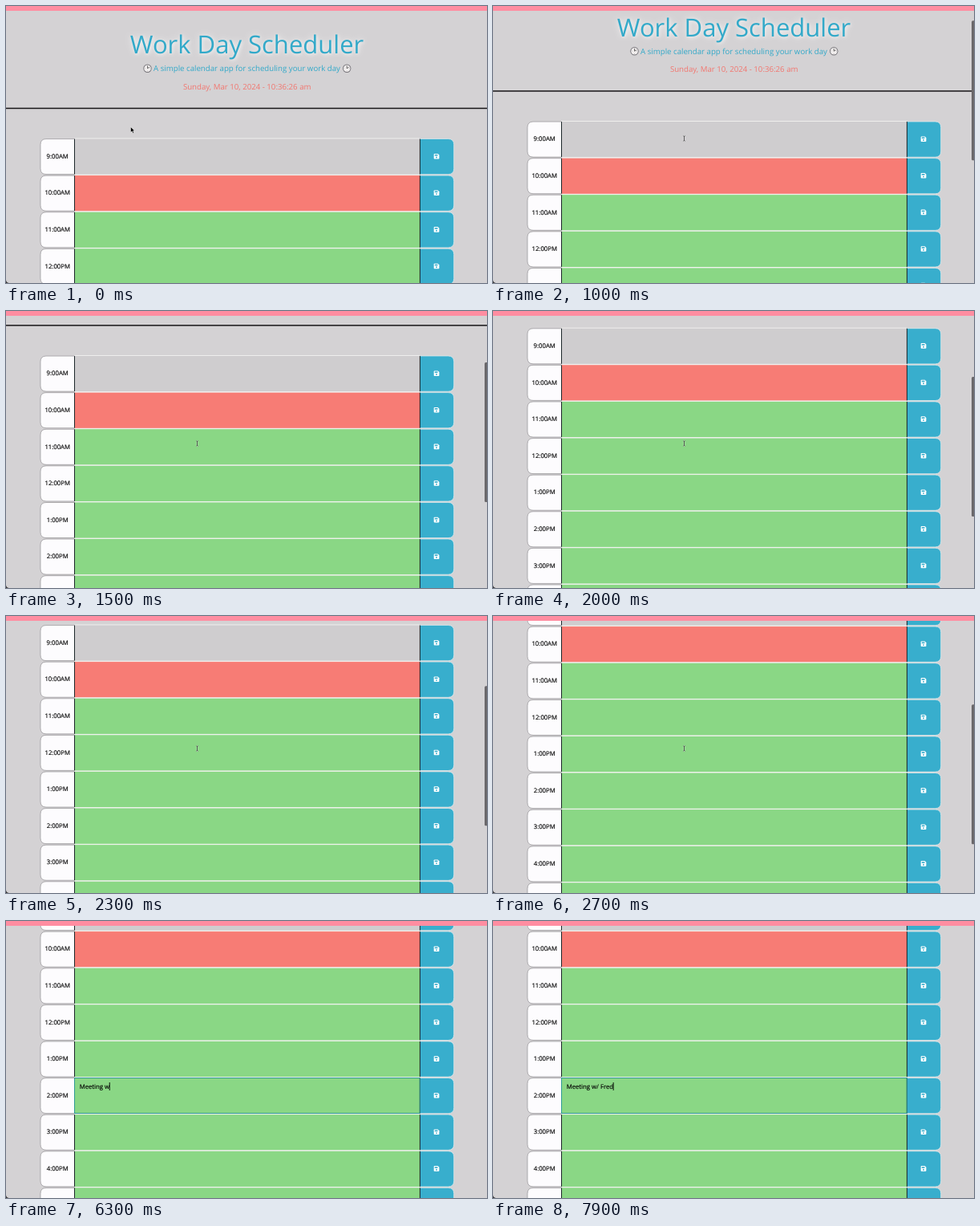
Recreate the animation shown at these times as an HTML page. Size 600 by 345 pixels, loop 8 s.

```html
<!DOCTYPE html>
<html lang="en">
<head>
<meta charset="utf-8">
<title>Work Day Scheduler</title>
<style>
  html, body { margin: 0; width: 100%; height: 100%; overflow: hidden; background: #d4d2d4; }
  svg { display: block; width: 600px; height: 345px; font: 7.74px "Open Sans", sans-serif; }
  text { white-space: pre; text-rendering: geometricPrecision; }
  .mid { text-anchor: middle; }
  .label { stroke: #000; stroke-width: .15; }
  .title { font-size: 31px; fill: #32a9c9; text-shadow: 1px 1px 4px #fff9, 0 0 10px #fffc; }
  .sub { font-size: 9.67px; }
</style>
</head>
<body>
<svg viewBox="0 0 600 345">
  <defs>
    <g id="clock">
      <circle r="5.2" fill="#77757a"/>
      <circle r="4.3" fill="#f1eeee"/>
      <path d="M0-3.2V0L2.4-1.4" fill="none" stroke="#444" stroke-width=".8"/>
      <path d="M-3.6 0h.8M2.8 0h.8M0 2.8v.8" stroke="#999" stroke-width=".6"/>
    </g>
    <g id="save">
      <path d="M-2.5-3.3H1.7L3.4-1.6V2.5a.8.8 0 0 1-.8.8H-2.5a.8.8 0 0 1-.8-.8V-2.5a.8.8 0 0 1 .8-.8Z" fill="#fff"/>
      <path d="M-2.2-2.3H1.5V-.6H-2.2Z" fill="#38aecd"/>
      <circle cy="1.3" r=".95" fill="#38aecd"/>
    </g>
  </defs>
  <rect width="600" height="345" fill="#d4d2d4"/>
  <g id="page">
    <text class="mid title" x="300.5" y="59">Work Day Scheduler</text>
    <text class="mid sub" x="300.5" y="81.3" fill="#32a9c9">A simple calendar app for scheduling your work day</text>
    <use href="#clock" x="176.5" y="77.7"/>
    <use href="#clock" x="425.2" y="77.7"/>
    <text id="date" class="mid sub" x="300.7" y="103.5" fill="#f2766f"></text>
    <rect y="126.7" width="600" height="1.5" fill="#171517"/>
    <g id="rows"></g>
    <g id="focus">
      <rect x="85.5" y="393.5" width="430.7" height="44" fill="none" stroke="#2f9a96"/>
      <text id="note" class="label" x="91.7" y="406.7"></text>
      <rect id="caret" y="399" width=".9" height="10"/>
    </g>
  </g>
  <rect id="bar" x="597" width="4" height="174" rx="1.5" fill="#6a686b"/>
  <rect width="600" height="6" fill="#ff8da1"/>
  <path d="M0 341.5Q.5 344.5 3.5 345H0Z" fill="#333"/>
  <path id="arrow" d="M0 0V7L1.7 5.5 2.8 8 4 7.4 3 5.1H5Z" fill="#000" stroke="#fff" stroke-width=".5"/>
  <g id="beam" fill="none">
    <path id="stem" d="M-1.2-3.2Q0-3.2 0-2.4Q0-3.2 1.2-3.2M0-2.4V2.4M-1.2 3.2Q0 3.2 0 2.4Q0 3.2 1.2 3.2" stroke="#fff" stroke-opacity=".5" stroke-width="1.6"/>
    <use href="#stem" style="display:none"/>
    <path d="M-1.2-3.2Q0-3.2 0-2.4Q0-3.2 1.2-3.2M0-2.4V2.4M-1.2 3.2Q0 3.2 0 2.4Q0 3.2 1.2 3.2" stroke="#222" stroke-width=".7"/>
  </g>
</svg>
<script>
const LOOP = 8000, STEP = 100, PITCH = 45.6, TOP = 164.8;
const el = id => document.getElementById(id);
const [page, date, rows, focus, note, caret, bar, arrow, beam] =
  ['page', 'date', 'rows', 'focus', 'note', 'caret', 'bar', 'arrow', 'beam'].map(el);

const scrollKeys = [[850, 0], [1000, 21.5], [1500, 109.5], [1800, 137], [2300, 154], [2700, 198]];
const xKeys = [[100, 155.5], [800, 238.5]];
const yKeys = [[100, 150.5], [800, 165], [3500, 165], [4000, 218]];
const barKeys = [[800, 0], [900, 1], [3300, 1], [3600, 0]];
const message = 'Meeting w/ Fred';
// When each further character count is reached
const typed = [[4500, 1], [4800, 2], [5000, 3], [5300, 4], [5500, 5], [5700, 6], [6000, 7],
  [6300, 9], [6600, 10], [6700, 11], [7400, 13], [7700, 14], [7900, 15]];

function at(keys, t) {
  const i = keys.findIndex(k => k[0] > t);
  if (i === 0) return keys[0][1];
  if (i < 0) return keys[keys.length - 1][1];
  const [[t0, a], [t1, b]] = [keys[i - 1], keys[i]];
  return a + (b - a) * (t - t0) / (t1 - t0);
}

function row(i) {
  const hour = 9 + i;
  const label = `${(hour - 1) % 12 + 1}:00${hour < 12 ? 'AM' : 'PM'}`;
  const color = hour < 10 ? '#cfcdcf' : hour < 11 ? '#f77c75' : '#8ad785';
  return `<g transform="translate(0 ${TOP + i * PITCH})">
    <path d="M85.5.8H50Q43 .8 43 7.8V37.8Q43 44.8 50 44.8H85.5" fill="#fdfcfe" stroke="#858387" stroke-width=".6"/>
    <rect x="85.5" y=".4" width="430.7" height="44.8" fill="${color}"/>
    <path d="M85.5.2H516M85.5 45.4H516" stroke="#f6f6f4" stroke-width=".8"/>
    <path d="M516.2.7H551.5Q558.7.7 558.7 7.9V37.7Q558.7 44.9 551.5 44.9H516.2" fill="#38aecd" stroke="#e4eef0" stroke-width=".7"/>
    <path d="M85.5.8V44.8M516.4.8V44.8" stroke="#1c2629"/>
    <text class="mid label" x="64.2" y="25">${label}</text>
    <use href="#save" x="537" y="22.4"/>
  </g>`;
}
rows.innerHTML = Array.from({ length: 9 }, (_, i) => row(i)).join('');
beam.innerHTML = ['stroke="#fff" stroke-opacity=".5" stroke-width="1.6"', 'stroke="#222" stroke-width=".7"']
  .map(style => `<path d="${el('stem').getAttribute('d')}" ${style}/>`).join('');

const show = (node, on) => node.setAttribute('visibility', on ? 'visible' : 'hidden');
let begin;

function draw(now) {
  begin ??= now;
  const t = Math.floor((now - begin) % LOOP / STEP) * STEP;
  const scroll = at(scrollKeys, t);
  page.setAttribute('transform', `translate(0 ${-scroll})`);
  date.textContent = `Sunday, Mar 10, 2024 - 10:36:${t < 1100 ? 26 : 27} am`;

  bar.setAttribute('y', 7 + scroll * .521);
  bar.setAttribute('opacity', at(barKeys, t));

  const place = `translate(${at(xKeys, t)} ${at(yKeys, t)})`;
  arrow.setAttribute('transform', place);
  beam.setAttribute('transform', place);
  show(arrow, t < 800);
  show(beam, t >= 800 && t < 4500);

  const count = typed.reduce((n, [start, k]) => t >= start ? k : n, 0);
  note.textContent = message.slice(0, count);
  caret.setAttribute('x', 91.4 + (count ? note.getComputedTextLength() : 0));
  show(focus, t >= 4100);
  requestAnimationFrame(draw);
}
requestAnimationFrame(draw);
</script>
</body>
</html>
```
